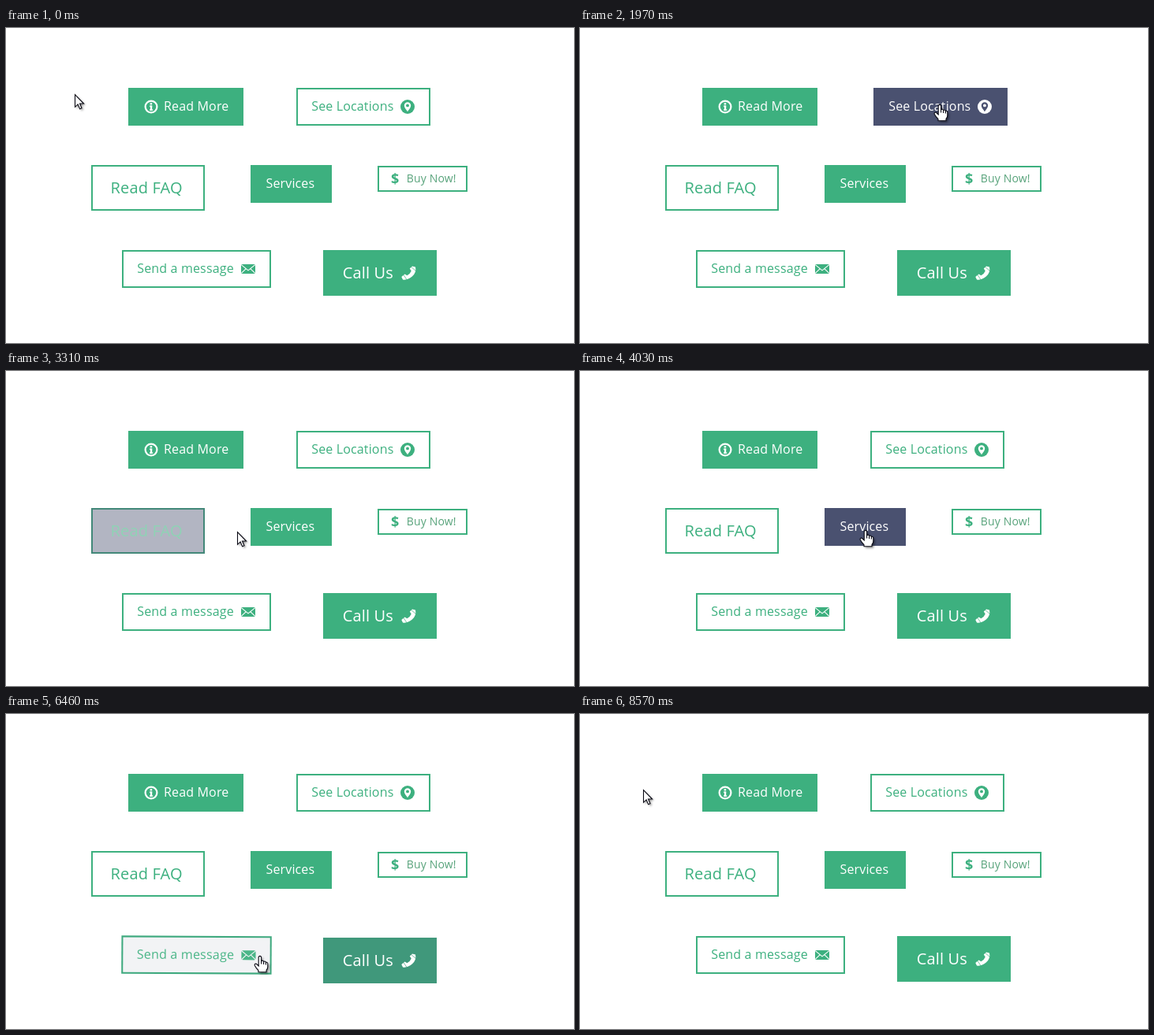
Write an HTML page with a canvas that moves like this. It is 720 px wide and 400 px high and loops after 9300 ms.

```html
<!DOCTYPE html>
<html lang="en">
<head>
<meta charset="utf-8">
<title>Button hover effects</title>
<style>
html, body { margin: 0; width: 100%; height: 100%; overflow: hidden; background: #fff; }
canvas { display: block; width: 720px; height: 400px; }
</style>
</head>
<body>
<canvas id="stage" width="720" height="400"></canvas>
<script>
const ctx = document.getElementById('stage').getContext('2d');
const LOOP = 9300, STEP = 30, FADE = 300;
const GREEN = [61, 176, 127], NAVY = [74, 81, 112], WHITE = [255, 255, 255], SAGE = [88, 163, 123];

const lerp = (a, b, p) => a + (b - a) * p;
const clamp = v => Math.max(0, Math.min(1, v));
const mix = (a, b, p) => `rgb(${a.map((v, i) => Math.round(lerp(v, b[i], p)))})`;

function bezier(x1, y1, x2, y2) {
  const at = (a, b, s) => 3 * a * s * (1 - s) ** 2 + 3 * b * s * s * (1 - s) + s ** 3;
  return x => {
    let lo = 0, hi = 1;
    for (let i = 0; i < 20; i++) {
      const mid = (lo + hi) / 2;
      if (at(x1, x2, mid) < x) lo = mid; else hi = mid;
    }
    return at(y1, y2, (lo + hi) / 2);
  };
}
const ease = bezier(.25, .1, .25, 1);
const easeInOut = bezier(.42, 0, .58, 1);

function wobble(age) {
  const stops = [0, 8, -6, 4, -2, 1, 0];
  const s = clamp(age / 1000) * 6, i = Math.min(5, Math.floor(s));
  return lerp(stops[i], stops[i + 1], easeInOut(s - i));
}

// Icons: f is the ink colour, b the colour behind it
function infoIcon(f) {
  ctx.strokeStyle = ctx.fillStyle = f;
  ctx.lineWidth = 2.2;
  ctx.beginPath();
  ctx.arc(184, 100, 7.4, 0, 7);
  ctx.stroke();
  ctx.fillRect(182.6, 95.2, 2.6, 2.2);
  ctx.fillRect(182, 98.6, 3.2, 1.5);
  ctx.fillRect(182.9, 98.6, 2.3, 6);
  ctx.fillRect(182, 103.3, 4.2, 1.5);
}
function dot(x, y, r, color) {
  ctx.fillStyle = color;
  ctx.beginPath();
  ctx.arc(x, y, r, 0, 7);
  ctx.fill();
}
function pinIcon(f, b) {
  dot(509, 100, 9, f);
  ctx.fillStyle = b;
  ctx.fill(new Path2D('M509 106.3C507.5 103.5 504.8 101 504.8 98.4A4.2 4.2 0 0 1 513.2 98.4C513.2 101 510.5 103.5 509 106.3Z'));
  dot(509, 98.4, 1.9, f);
}
function dollarIcon(f) {
  ctx.fillStyle = f;
  ctx.font = '700 18px "Open Sans", sans-serif';
  ctx.fillText('$', 488, 198);
}
function mailIcon(f, b) {
  ctx.fillStyle = f;
  ctx.beginPath();
  ctx.roundRect(298, 300, 18, 12, 1.8);
  ctx.fill();
  ctx.strokeStyle = b;
  ctx.lineWidth = 1.1;
  ctx.stroke(new Path2D('M298.5 300.8L307 307.8L315.5 300.8M298.5 311.2L304 305.8M315.5 311.2L310 305.8'));
}
function phoneIcon(f, b) {
  ctx.fillStyle = f;
  ctx.fill(new Path2D('M515 302.5L519 303.4Q520.6 310 514.8 315.6Q509 320.6 503 319.5L501.3 316L505.5 312.5L508.4 314.3Q512.5 312 513.8 308.5L511.8 305.5Z'));
  ctx.strokeStyle = b;
  ctx.lineWidth = .7;
  ctx.stroke(new Path2D('M503.5 313L508 319.5M513 303L519 308'));
}

function floatShadow(b, p) {
  const w = b.w * .9, cx = b.x + b.w / 2, top = b.y + b.h + 5 * p;
  ctx.save();
  ctx.globalAlpha = p;
  ctx.translate(cx, top + 5);
  ctx.scale(w / 10, 1);
  const g = ctx.createRadialGradient(0, 0, 0, 0, 0, 7.07);
  g.addColorStop(0, 'rgba(0,0,0,.35)');
  g.addColorStop(.8, 'rgba(0,0,0,0)');
  ctx.fillStyle = g;
  ctx.fillRect(-5, -5, 10, 10);
  ctx.restore();
}

const effects = {
  float(b, p) { ctx.translate(0, -5 * p); if (p > 0) floatShadow(b, p); },
  wobble(b, p, age) { ctx.translate(age >= 0 ? wobble(age) : 0, 0); },
  sink(b, p) { ctx.translate(0, 8 * p); },
  growRotate(b, p) {
    const cx = b.x + b.w / 2, cy = b.y + b.h / 2, s = 1 + .1 * p;
    ctx.translate(cx, cy);
    ctx.rotate(4 * p * Math.PI / 180);
    ctx.scale(s, s);
    ctx.translate(-cx, -cy);
  }
};

const buttons = [
  { x: 155, y: 76, w: 146, h: 48, solid: true, text: 'Read More', tx: 200, ty: 105, size: 16, icon: infoIcon, fx: 'float', on: 345, off: 1240 },
  { x: 368, y: 76, w: 170, h: 48, text: 'See Locations', tx: 387.3, ty: 105, size: 16, icon: pinIcon, fx: 'wobble', on: 1440, off: 2105 },
  { x: 108, y: 174, w: 144, h: 58, text: 'Read FAQ', tx: 132.5, ty: 210, size: 20, on: 2300, off: 3200 },
  { x: 310, y: 174, w: 103, h: 48, solid: true, text: 'Services', tx: 329.5, ty: 203, size: 16, weight: 500, on: 3370, off: 4055 },
  { x: 471, y: 175, w: 114, h: 33, text: 'Buy Now!', tx: 507.8, ty: 196, size: 14, ink: SAGE, icon: dollarIcon, on: 4085, off: 5190 },
  { x: 147, y: 282, w: 189, h: 48, text: 'Send a message', tx: 166.3, ty: 311, size: 16, icon: mailIcon, fx: 'growRotate', on: 6425, off: 7540 },
  { x: 402, y: 282, w: 144, h: 58, solid: true, text: 'Call Us', tx: 426.8, ty: 318, size: 20, icon: phoneIcon, fx: 'sink', on: 5555, off: 6315 }
];

const hovered = (b, t) => t >= b.on && t < b.off;

function drawButton(b, t) {
  const p = ease(clamp((t - b.on) / FADE)) - ease(clamp((t - b.off) / FADE));
  const back = mix(b.solid ? GREEN : WHITE, NAVY, p);
  const fore = mix(b.solid ? WHITE : GREEN, WHITE, p);
  ctx.save();
  if (b.fx) effects[b.fx](b, p, hovered(b, t) ? t - b.on : -1);
  ctx.fillStyle = mix(GREEN, NAVY, p);
  ctx.fillRect(b.x, b.y, b.w, b.h);
  ctx.fillStyle = back;
  ctx.fillRect(b.x + 2, b.y + 2, b.w - 4, b.h - 4);
  if (b.icon) b.icon(fore, back);
  ctx.font = `${b.weight || 400} ${b.size}px "Open Sans", sans-serif`;
  ctx.letterSpacing = '0.15px';
  ctx.fillStyle = b.ink ? mix(b.ink, WHITE, p) : fore;
  ctx.fillText(b.text, b.tx, b.ty);
  ctx.restore();
}

// Pointer path: time, x, y
const path = [
  [0, 87, 84], [90, 111, 84], [220, 111, 84], [340, 158, 92], [500, 222, 101],
  [1040, 222, 101], [1240, 302, 98], [1440, 370, 100], [1700, 440, 101], [1900, 456, 97],
  [2000, 456, 97], [2110, 420, 126], [2300, 250, 180], [2630, 236, 188], [2900, 214, 200],
  [3100, 214, 200], [3200, 254, 203], [3370, 314, 204], [3700, 362, 202],
  [4020, 362, 202], [4085, 472, 196], [4220, 506, 191],
  [5020, 506, 191], [5190, 503, 209], [5390, 499, 231], [5555, 484, 283], [5740, 469, 308], [5930, 466, 312],
  [6190, 466, 312], [6315, 401, 312], [6425, 335, 308], [6700, 222, 304],
  [7220, 222, 304], [7400, 196, 300], [7510, 138, 290], [7550, 98, 282], [7700, 56, 254], [7900, 44, 205], [8180, 68, 138],
  [8200, 68, 138], [8400, 72, 112], [8570, 80, 96], [LOOP, 80, 96]
];

function slope(i, k) {
  const a = path[i - 1], b = path[i], c = path[i + 1];
  if (!a || !c) return 0;
  const before = (b[k] - a[k]) / (b[0] - a[0]), after = (c[k] - b[k]) / (c[0] - b[0]);
  return before * after <= 0 ? 0 : 2 * before * after / (before + after);
}
function pointer(t) {
  let i = 0;
  while (i < path.length - 2 && path[i + 1][0] <= t) i++;
  const a = path[i], b = path[i + 1], d = b[0] - a[0], s = clamp((t - a[0]) / d);
  return [1, 2].map(k =>
    lerp(a[k], b[k], s * s * (3 - 2 * s)) +
    d * s * (1 - s) * (slope(i, k) * (1 - s) - slope(i + 1, k) * s));
}

const arrow = new Path2D('M.5.5V16.3L4.1 12.9L6.6 18.8L9 17.8L6.5 12H11.6Z');
const hand = new Path2D('M-1.8 1.6Q0-.8 1.6 1.6V6.6Q4 5.4 4.6 7.4Q7 6.4 7.4 8.4Q9.8 7.8 9.8 10.5V14Q9.8 16.5 8 18.4V20.8H-2V18.6Q-5 15.5-6.8 12.2Q-7.2 9.6-4.6 10.3L-1.8 13Z');
const knuckles = new Path2D('M1.6 6.6V10.6M4.6 7.4V11M7.4 8.4V11.4');

function drawPointer(t) {
  const [x, y] = pointer(t), over = buttons.some(b => hovered(b, t));
  const shape = over ? hand : arrow;
  ctx.save();
  ctx.translate(Math.round(x), Math.round(y));
  ctx.save();
  ctx.shadowColor = 'rgba(0,0,0,.45)';
  ctx.shadowBlur = 3;
  ctx.shadowOffsetX = ctx.shadowOffsetY = 2;
  ctx.fillStyle = '#fff';
  ctx.fill(shape);
  ctx.restore();
  ctx.strokeStyle = '#0a0a14';
  ctx.lineWidth = 1.1;
  ctx.stroke(shape);
  if (over) ctx.stroke(knuckles);
  ctx.restore();
}

function draw(now) {
  const t = Math.floor((now % LOOP) / STEP) * STEP;
  ctx.fillStyle = '#fff';
  ctx.fillRect(0, 0, 720, 400);
  for (const b of buttons) drawButton(b, t);
  drawPointer(t);
}

let start;
function tick(now) {
  start ??= now;
  draw(now - start);
  requestAnimationFrame(tick);
}
draw(0);
requestAnimationFrame(tick);
</script>
</body>
</html>
```
